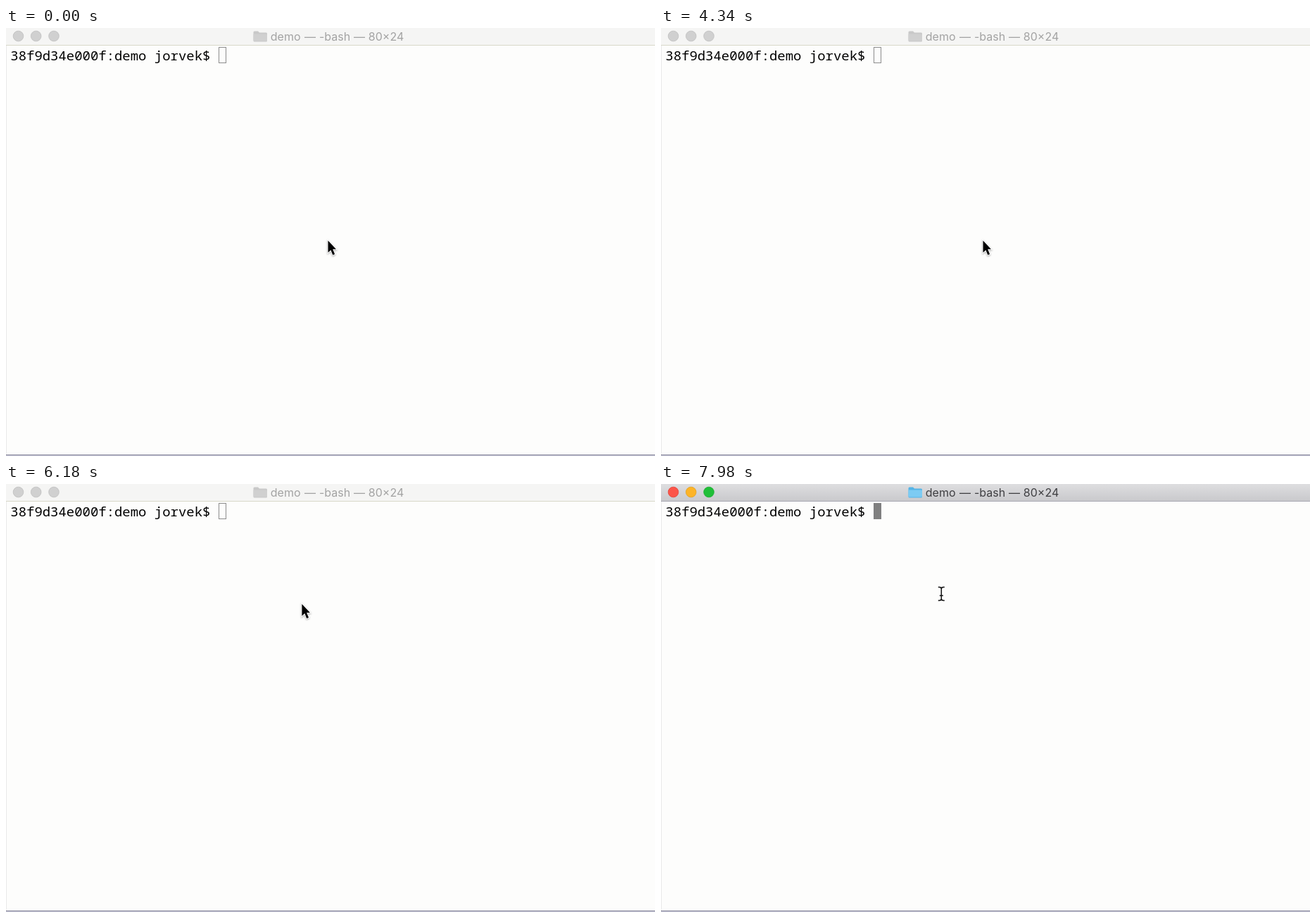
An HTML page that plays this animation: 922 px wide and 608 px high, repeating every 8000 ms.

```html
<!DOCTYPE html>
<html lang="en">
<head>
<meta charset="utf-8">
<title>Terminal</title>
<style>
  html, body { margin: 0; width: 100%; height: 100%; overflow: hidden; background: #fdfdfc; }
  svg { display: block; width: 922px; height: 608px; }
  .title { font: 400 16px Inter, "Liberation Sans", sans-serif; fill: #a3a3a3; }
  .prompt { font: 500 18.95px "Noto Sans Mono", "DejaVu Sans Mono", monospace; fill: #000; white-space: pre; }
  .bar { fill: #f5f5f4; }
  .edge { fill: #d8d8c9; }
  .light { fill: #d0d0d0; stroke: #bebebe; stroke-width: .8; }
  .folder { fill: #c9c9c9; }
  .flap { fill: #d0d0d0; }
  .block { fill: #fdfdfc; stroke: #8c8c8c; }
  .active .title { fill: #3f3f42; }
  .active .bar { fill: url(#metal); }
  .active .edge { fill: #a9a9b3; }
  .active .folder { fill: #55b4e6; }
  .active .flap { fill: #7ccbf3; }
  .active .red { fill: #fc5549; stroke: #e0443c; }
  .active .amber { fill: #fdb427; stroke: #dfa023; }
  .active .green { fill: #20bf38; stroke: #1aab2d; }
  .filled .block { fill: #808080; stroke: #808080; }
</style>
</head>
<body>
<svg id="stage" viewBox="0 0 922 608">
  <defs>
    <linearGradient id="metal" x1="0" y1="0" x2="0" y2="1">
      <stop offset="0" stop-color="#dedee0"/>
      <stop offset="1" stop-color="#c9c9cc"/>
    </linearGradient>
  </defs>
  <rect width="922" height="608" fill="#fdfdfc"/>
  <rect class="bar" width="922" height="24"/>
  <rect class="edge" y="24" width="922" height="1"/>
  <circle class="light red" cx="17.5" cy="11.5" r="7.3"/>
  <circle class="light amber" cx="42.7" cy="11.5" r="7.3"/>
  <circle class="light green" cx="68" cy="11.5" r="7.3"/>
  <path class="folder" d="M351.5 6q0-1.5 1.5-1.5h5l2 2h9.500q1.500 0 1.500 1.500v10q0 1.500-1.500 1.500h-16.500q-1.500 0-1.500-1.500z"/>
  <rect class="flap" x="351.500" y="8.500" width="19.500" height="10" rx="1"/>
  <text class="title" y="17.500"><tspan x="375.800">demo</tspan><tspan x="424">—</tspan><tspan x="445">-bash</tspan><tspan x="494">—</tspan><tspan x="514.800">80×24</tspan></text>
  <text class="prompt" x="6.300" y="46">38f9d34e000f:demo jorvek$</text>
  <rect class="block" x="302.500" y="27.500" width="10" height="22"/>
  <rect y="25" width="1" height="581" fill="#e9e9e9"/>
  <rect y="606" width="922" height="1" fill="#77778f"/>
  <rect y="607" width="922" height="1" fill="#d5d5e2"/>
  <g id="arrow">
    <path d="M0 0V17L3.900 13.400 6.800 20.500 9.600 19.300 6.700 12.300H11.500Z" fill="#000"
      stroke="#fff" stroke-width="2" paint-order="stroke" style="filter:drop-shadow(0 1px 1px #0005)"/>
  </g>
  <g id="beam" transform="translate(398.300 156)" fill="none" stroke="#111" stroke-width="1.500">
    <path d="M-4.500-9.500h1.500Q0-9.500 0-7V7Q0 9.500-3 9.500h-1.500M4.500-9.500H3Q0-9.500 0-7M0 7Q0 9.500 3 9.500h1.500M-2.500 2.500h5"/>
  </g>
</svg>
<script>
  const LOOP = 8000, STEP = 40;
  const CLICK = 6860, FOCUS = 6880, FILL = 6980;

  // Pointer tip: time, x, y
  const path = [
    [5560, 457.500, 302], [5600, 457, 293], [5700, 456, 274], [5800, 452, 247],
    [5900, 447, 220], [6000, 441, 199], [6100, 430, 180], [6200, 414, 164],
    [6280, 401, 155], [6320, 397.500, 153]
  ];

  const stage = document.getElementById("stage");
  const arrow = document.getElementById("arrow");
  const beam = document.getElementById("beam");

  function pointerAt(time) {
    const t = time < 5600 ? 0 : Math.floor(time / STEP) * STEP;
    const next = path.findIndex(p => p[0] > t);
    if (next === 0) return path[0].slice(1);
    if (next < 0) return path[path.length - 1].slice(1);
    const [t0, x0, y0] = path[next - 1], [t1, x1, y1] = path[next];
    const k = (t - t0) / (t1 - t0);
    return [x0 + (x1 - x0) * k, y0 + (y1 - y0) * k];
  }

  function draw(time) {
    const clicked = time >= CLICK;
    arrow.style.display = clicked ? "none" : "";
    beam.style.display = clicked ? "" : "none";
    arrow.setAttribute("transform", `translate(${pointerAt(time)})`);
    stage.classList.toggle("active", time >= FOCUS);
    stage.classList.toggle("filled", time >= FILL);
  }

  const start = performance.now();
  function tick() {
    draw((performance.now() - start) % LOOP);
    requestAnimationFrame(tick);
  }
  tick();
</script>
</body>
</html>
```
